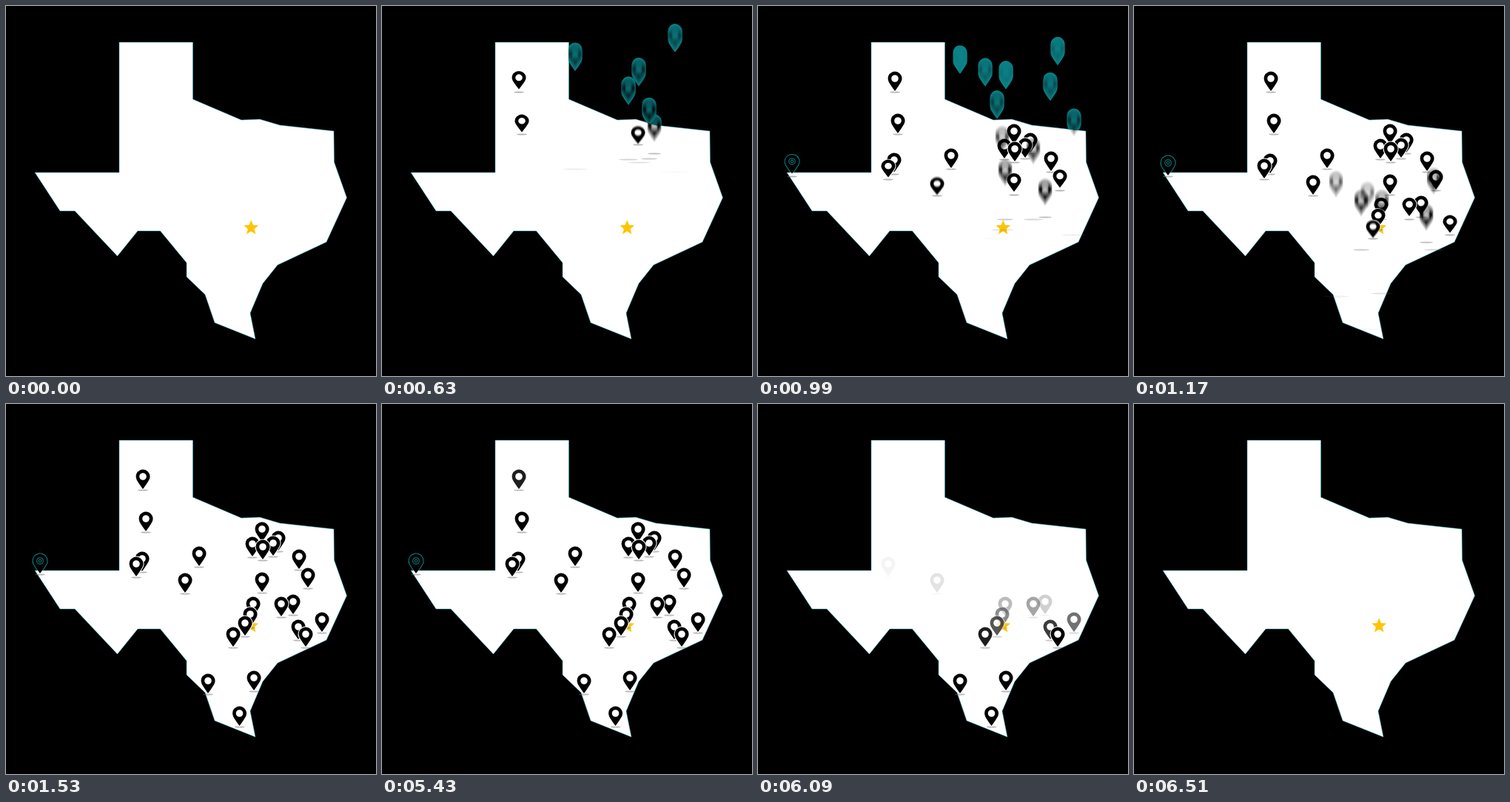
These frames come from a looping animation (500 by 500 pixels, 7.2 s). An HTML page with a canvas:

```html
<!DOCTYPE html>
<html lang="en">
<head>
<meta charset="utf-8">
<title>Map pins</title>
<style>
html, body { margin: 0; width: 100%; height: 100%; overflow: hidden; background: #000; }
canvas { display: block; }
</style>
</head>
<body>
<canvas id="stage" width="500" height="500"></canvas>
<script>
const ctx = document.getElementById('stage').getContext('2d');
const LOOP = 7200, STEP = 30, TEAL = '#0c858b';
const DROP = 510, FADE = 5430;

const land = new Path2D('M153 49H252.5V126L318 154 343 153 370 161 443 169 443.5 211 460.5 259 433 319 367 350 347 375 330 415 337 450 282 428 269 390 244 366V347L208.500 304H178L150.500 338 93 277H73L39 225H153Z');
const sea = new Path2D('M0 0H500V500H0Z');
sea.addPath(land);

// Centre of each pin head, in order of landing
const pins = [
  [185, 98], [189, 155], [346, 169], [368, 181], [361, 188], [333, 189], [347, 193],
  [261, 202], [396, 206], [184, 209], [46, 212], [346, 237], [408, 231], [176, 216],
  [242, 238], [388, 267], [334, 270], [372, 270], [330, 284], [427, 291], [323, 296],
  [395, 301], [307, 311], [405, 311], [335, 370], [273, 374], [315.5, 418]
];

const body = new Path2D();
body.arc(0, 0, 9.5, Math.PI * 0.86, Math.PI * 2.14);
body.quadraticCurveTo(6, 9, 0, 17);
body.quadraticCurveTo(-6, 9, -8.6, 4.05);
body.closePath();
const hole = new Path2D();
hole.arc(0, 0, 4.8, 0, 7);
const pin = new Path2D(body);
pin.addPath(hole);
const dot = new Path2D();
dot.arc(0, 0, 1.9, 0, 7);

const star = new Path2D();
for (let i = 0; i < 10; i++) {
  const a = i * Math.PI / 5, r = i % 2 ? 4.6 : 10.5;
  star.lineTo(331.2 + r * Math.sin(a), 299.8 - r * Math.cos(a));
}

// A pin averaged over a vertical distance, for motion blur
function smear(spread) {
  const c = document.createElement('canvas');
  c.width = 40;
  c.height = 60;
  const g = c.getContext('2d'), n = 13;
  g.globalCompositeOperation = 'lighter';
  g.globalAlpha = 1 / n;
  for (let i = 0; i < n; i++) {
    g.setTransform(1, 0, 0, 1, 20, 26 + spread * (2 * i / (n - 1) - 1));
    g.fill(pin, 'evenodd');
  }
  return c;
}
const fast = smear(6), slow = smear(2);

function within(area, paint) {
  ctx.save();
  ctx.clip(area, 'evenodd');
  paint();
  ctx.restore();
}

function shadow(x, y, k, alpha) {
  ctx.globalAlpha = Math.max(0, 0.55 * (1 - k / 6.5)) * alpha;
  ctx.fillStyle = '#777';
  ctx.beginPath();
  ctx.ellipse(x, y + 18.5, 7 + 2 * k, 0.9, 0, 0, 7);
  ctx.fill();
  ctx.globalAlpha = 1;
}

function falling(x, y, k) {
  const dy = -(29.4 * k - 10) + 0.9 * Math.max(0, k - 8) ** 2;
  shadow(x, y, k, 1);
  if (y + dy < 27) return;
  ctx.save();
  ctx.translate(x, y + dy);
  ctx.save();
  ctx.translate(-x, -y - dy);
  ctx.clip(sea, 'evenodd');
  ctx.translate(x, y + dy);
  ctx.fillStyle = TEAL;
  for (let s = -6; s <= 6; s += 2) {
    ctx.save();
    ctx.translate(0, s);
    ctx.fill(body);
    ctx.restore();
  }
  ctx.restore();
  ctx.globalAlpha = (11.5 - k) / 11;
  ctx.drawImage(fast, -20, -26);
  ctx.restore();
}

function standing(x, y, age, alpha) {
  const rest = Math.min(1, age / 180);
  const hop = 3 * Math.sin(Math.PI * rest);
  const squash = 1 - 0.12 * (1 - rest);
  const place = () => {
    ctx.translate(x, y + 17 - hop);
    ctx.scale(1, squash);
    ctx.translate(0, -17);
  };
  shadow(x, y, 0, alpha);
  ctx.lineWidth = 2;
  within(land, () => {
    place();
    ctx.globalAlpha = alpha;
    ctx.fillStyle = ctx.strokeStyle = '#fff';
    ctx.fill(body);
    ctx.stroke(body);
  });
  if (alpha > 0.1) within(sea, () => {
    place();
    ctx.fillStyle = ctx.strokeStyle = TEAL;
    ctx.fill(pin, 'evenodd');
    ctx.stroke(pin);
    ctx.lineWidth = 1;
    ctx.stroke(dot);
  });
  ctx.save();
  place();
  ctx.globalAlpha = alpha;
  ctx.fillStyle = '#000';
  if (age < STEP) ctx.drawImage(slow, -20, -26);
  else ctx.fill(pin, 'evenodd');
  ctx.restore();
}

function draw(t) {
  ctx.fillStyle = '#000';
  ctx.fillRect(0, 0, 500, 500);
  ctx.fillStyle = '#fff';
  ctx.fill(land);
  ctx.lineWidth = 0.8;
  ctx.strokeStyle = 'rgba(30,170,178,.6)';
  ctx.stroke(land);
  ctx.fillStyle = '#ffc400';
  ctx.fill(star);
  if (t < DROP) return;
  pins.forEach(([x, y], i) => {
    const age = t - (DROP + 60 + i * STEP);
    const gone = (t - FADE - (i - 1) * STEP) / 330;
    const alpha = (1 - Math.min(1, Math.max(0, gone))) ** 1.3;
    if (age < 0) {
      if (-age / STEP < 11.5) falling(x, y, -age / STEP);
    } else if (alpha > 0.001) standing(x, y, age, alpha);
  });
}

const start = performance.now();
function tick() {
  const t = (performance.now() - start) % LOOP;
  draw(Math.floor(t / STEP) * STEP);
  requestAnimationFrame(tick);
}
tick();
</script>
</body>
</html>
```
